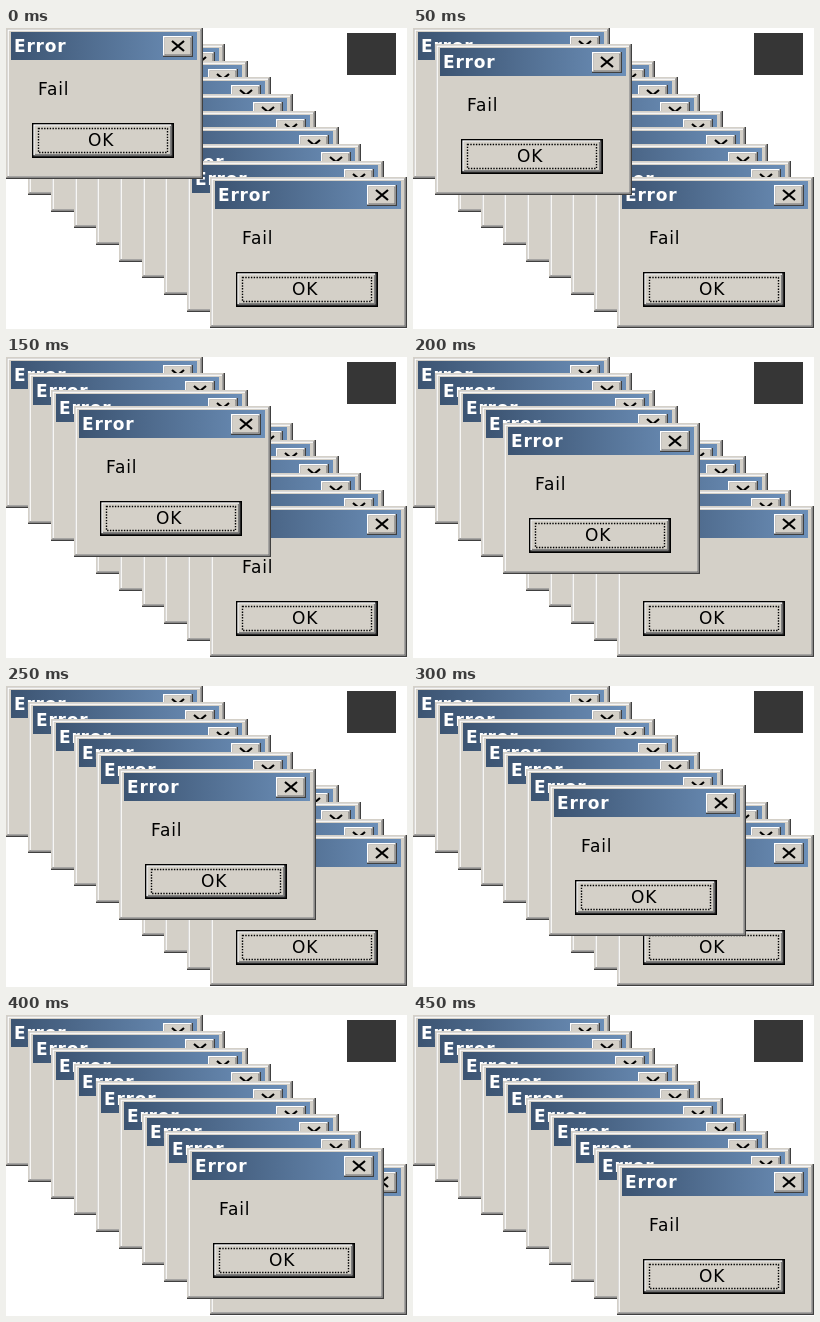
An HTML page with a canvas that plays this animation: 401x301 px, repeating every 500 ms.

```html
<!DOCTYPE html>
<html lang="en">
<head>
<meta charset="utf-8">
<title>Error cascade</title>
<style>
  html, body { margin: 0; width: 100%; height: 100%; overflow: hidden; background: #fff; }
  canvas { display: block; }
</style>
</head>
<body>
<canvas id="stage" width="401" height="301"></canvas>
<script>
const ctx = document.getElementById('stage').getContext('2d');
const COUNT = 10, STEP_MS = 50;
const FACE = '#d4d0c8';
const EDGE = 1.4; // width of one bevel line

function rect(x, y, w, h, fill) {
  ctx.fillStyle = fill;
  ctx.fillRect(x, y, w, h);
}

// Raised box: outer and inner edges, lit from the top left.
function bevel(x, y, w, h, outerLight, innerLight) {
  rect(x, y, w, h, '#404040');
  rect(x, y, w - EDGE, h - EDGE, outerLight);
  rect(x + EDGE, y + EDGE, w - 2 * EDGE, h - 2 * EDGE, '#808080');
  rect(x + EDGE, y + EDGE, w - 3 * EDGE, h - 3 * EDGE, innerLight);
  rect(x + 2 * EDGE, y + 2 * EDGE, w - 4 * EDGE, h - 4 * EDGE, FACE);
}

function label(text, x, y, color, weight = '') {
  ctx.font = `${weight} 17px "DejaVu Sans", Verdana, sans-serif`;
  ctx.letterSpacing = '0.8px';
  ctx.fillStyle = color;
  ctx.fillText(text, x, y);
}

function closeButton(x, y) {
  bevel(x, y, 30, 21, '#fff', FACE);
  ctx.strokeStyle = '#000';
  ctx.lineWidth = 2.2;
  ctx.beginPath();
  ctx.moveTo(x + 9, y + 5);
  ctx.lineTo(x + 21, y + 15);
  ctx.moveTo(x + 21, y + 5);
  ctx.lineTo(x + 9, y + 15);
  ctx.stroke();
}

function okButton(x, y) {
  rect(x, y, 142, 35, '#000');
  bevel(x + EDGE, y + EDGE, 142 - 2 * EDGE, 35 - 2 * EDGE, '#fff', FACE);
  ctx.strokeStyle = '#000';
  ctx.lineWidth = EDGE;
  ctx.setLineDash([EDGE, EDGE]);
  ctx.strokeRect(x + 6.5, y + 5.5, 129, 24);
  ctx.setLineDash([]);
  label('OK', x + 56, y + 23, '#000');
}

function dialog(i) {
  ctx.save();
  ctx.translate(Math.floor(i * 22.7), Math.floor(i * 16.65));
  bevel(0, 0, 197, 151, FACE, '#fff');
  const bar = ctx.createLinearGradient(5, 0, 191, 0);
  bar.addColorStop(0, '#3c5472');
  bar.addColorStop(1, '#6c8fb8');
  rect(5, 4, 186, 28, bar);
  label('Error', 8, 24, '#fff', 'bold');
  closeButton(157, 8);
  label('Fail', 32, 66.5, '#000');
  okButton(26, 95);
  ctx.restore();
}

function draw(now) {
  const top = Math.floor(now / STEP_MS) % COUNT;
  rect(0, 0, 401, 301, '#fff');
  for (let i = 0; i < COUNT; i++) dialog(i);
  for (let i = 0; i <= top; i++) dialog(i);
  rect(341, 5, 49, 42, '#363636');
  requestAnimationFrame(draw);
}

draw(0);
</script>
</body>
</html>
```
